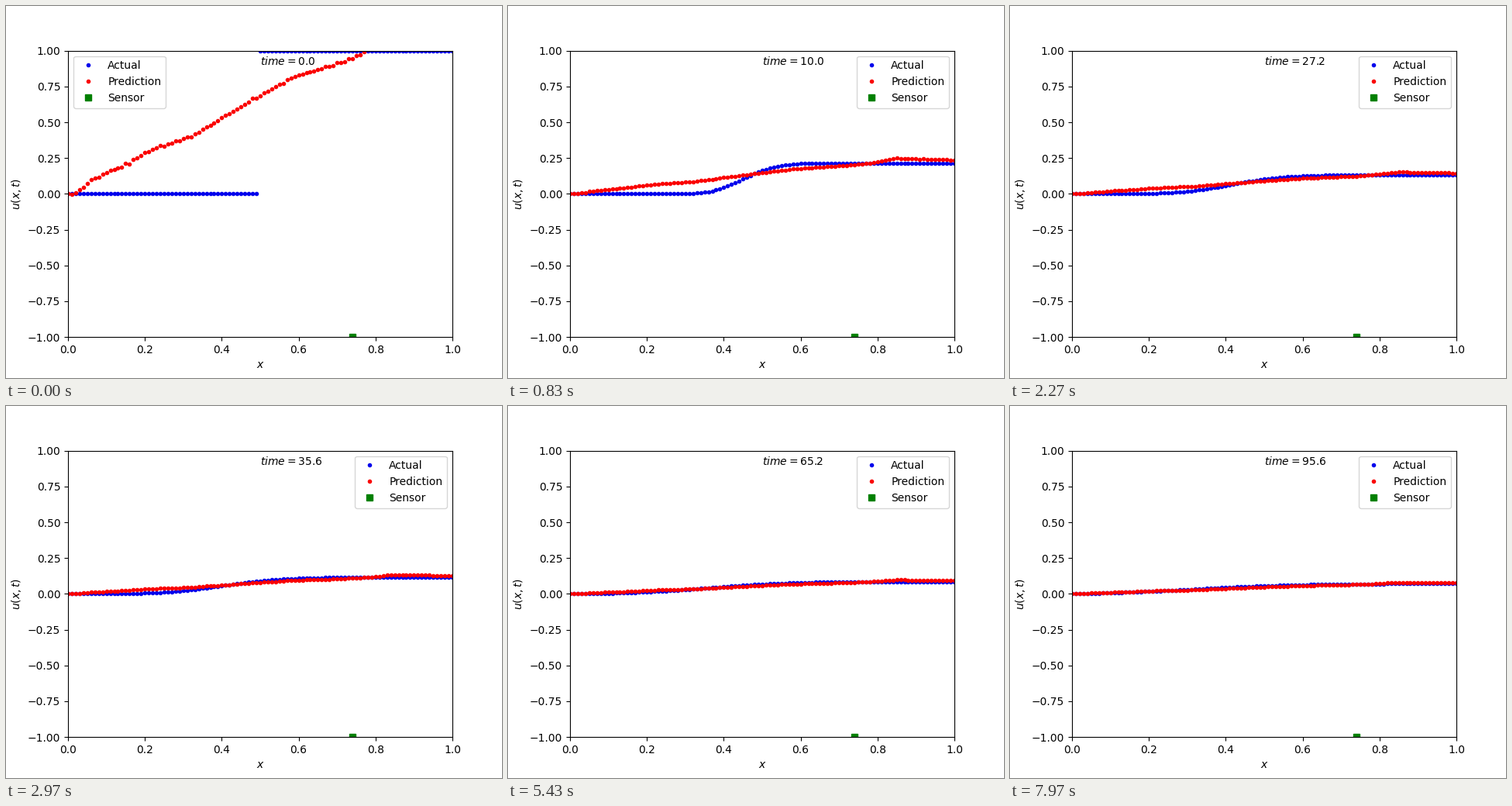
Write a matplotlib script that moves like this. It is 640 by 480 pixels and loops after 8 s.

```python
import matplotlib.pyplot as plt
import numpy as np
from matplotlib.animation import FuncAnimation

LOOP_MS = 8000
TICK_MS = 20        # finer than a step, so steps fall on rounded 10 ms times
STEPS = 240
STEP_MS = LOOP_MS / STEPS
DT = 0.4            # model time per step
SUBSTEPS = 4
DIFFUSION = 0.00025
DECAY = 1.04
SENSOR = 74         # grid index of the sensor
BLUE, RED, GREEN = "#0000ec", "#fa0000", "#008000"

x = np.linspace(0, 1, 101)


def solve():
    """Step profile under u_t = D u_xx - k u^3, diffusion and decay in turn."""
    dt = DT / SUBSTEPS
    r = DIFFUSION * dt / (x[1] - x[0]) ** 2
    u = np.where(np.arange(x.size) >= 50, 1.0, 0.0)
    rows = [u]
    for _ in range(STEPS - 1):
        for _ in range(SUBSTEPS):
            pad = np.concatenate(([0], u, [u[-1]]))
            u = u + r * (pad[2:] - 2 * u + pad[:-2])
            u = u / np.sqrt(1 + 2 * DECAY * dt * u ** 2)
            u[0] = 0
        rows.append(u)
    return np.array(rows)


def predicted_mode():
    """Rising line with a few bends and a slight seeded roughness."""
    bend_x = [0, 0.02, 0.06, 0.16, 0.20, 0.25, 0.33, 0.44, 0.58, 0.74, 0.77, 0.85, 1]
    bend_y = [0, 0.0, 0.10, 0.215, 0.289, 0.34, 0.413, 0.597, 0.808, 0.943, 0.993, 1.165, 1.10]
    rough = np.random.default_rng(4).normal(0, 0.004, x.size)
    rough[0] = 0
    return np.interp(x, bend_x, bend_y) + rough


actual = solve()
prediction = actual[:, SENSOR, None] * predicted_mode()

fig, ax = plt.subplots(figsize=(6.4, 4.8), dpi=100)
ax.set(xlim=(0, 1), ylim=(-1, 1), xlabel="$x$", ylabel="$u(x,t)$")
actual_dots, = ax.plot(x, actual[0], ".", color=BLUE, label="Actual")
prediction_dots, = ax.plot(x, prediction[0], ".", color=RED, label="Prediction")
ax.plot(x[SENSOR], -1, "s", color=GREEN, label="Sensor")
clock = ax.text(0.5, 0.9, "")
ax.legend(loc="best")


def update(tick):
    mid = (tick + 0.5) * TICK_MS
    i = int((mid + 5) / STEP_MS) % STEPS
    actual_dots.set_ydata(actual[i])
    prediction_dots.set_ydata(prediction[i])
    clock.set_text(f"$time = {i * DT:.1f}$")
    return actual_dots, prediction_dots, clock


anim = FuncAnimation(fig, update, frames=LOOP_MS // TICK_MS, interval=TICK_MS,
                     repeat=True, repeat_delay=0)
plt.show()
```
